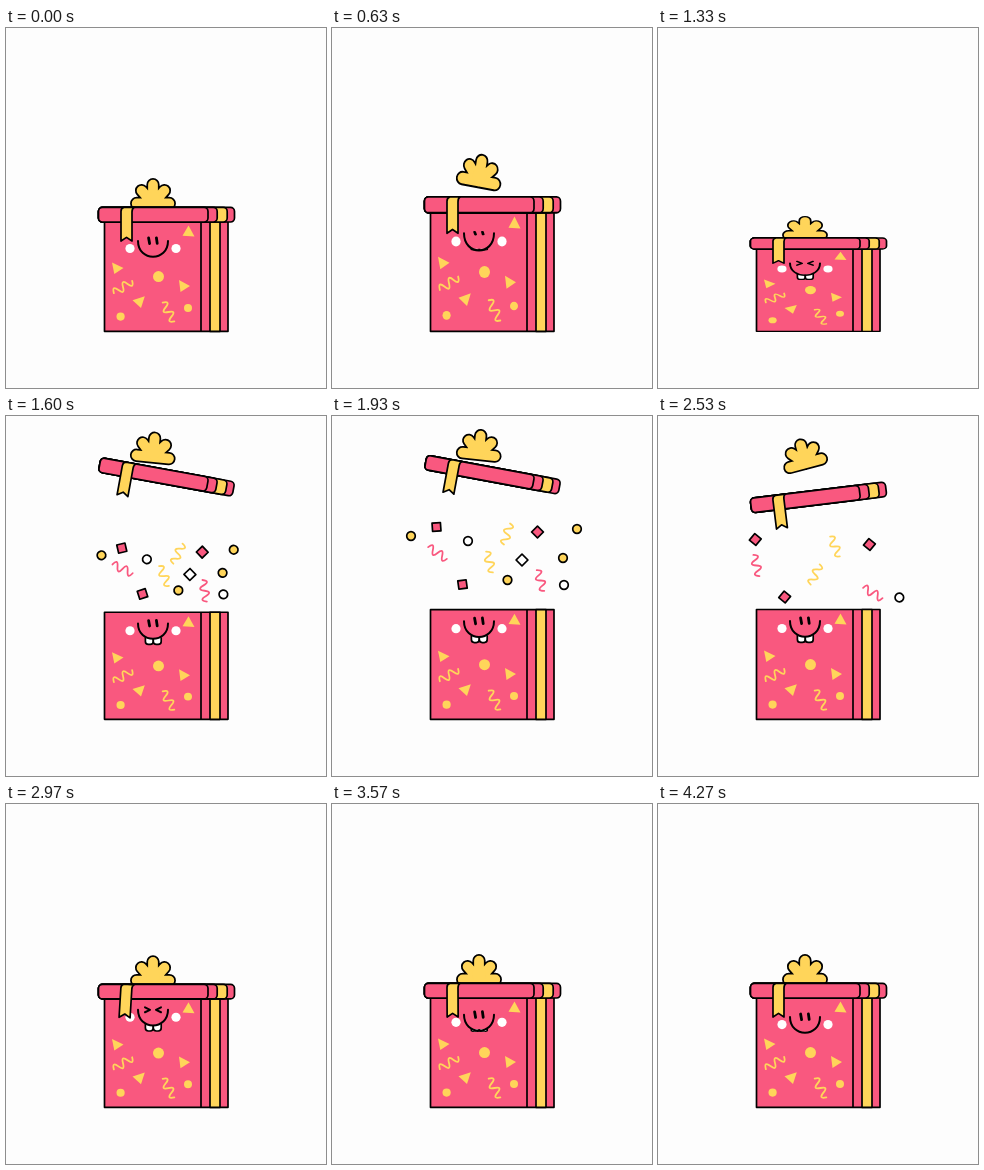
An HTML page that plays this animation: 320 px wide and 360 px high, repeating every 5.01 s.

```html
<!DOCTYPE html>
<html lang="en">
<head>
<meta charset="utf-8">
<title>Gift box</title>
<style>
  html, body { margin: 0; width: 100%; height: 100%; overflow: hidden; background: #fdfdfd; }
  svg { display: block; width: 100%; height: 100%; }
  .pink { fill: #f9587f; }
  .gold { fill: #ffd55a; }
  .white { fill: #fff; }
  .ink { stroke: #000; stroke-width: 1.7; stroke-linejoin: round; }
  .line { fill: none; stroke: #000; stroke-width: 2; stroke-linecap: round; stroke-linejoin: round; }
  .wave { fill: none; stroke-width: 1.8; stroke-linecap: round; }
  .wave.pink { stroke: #f9587f; }
  .wave.gold { stroke: #ffd55a; }
  #eyes { stroke-width: 2.8; }
</style>
</head>
<body>
<svg viewBox="0 0 320 360">
  <defs>
    <path id="wave" d="M-11 0q2.75-8 5.5 0t5.5 0 5.5 0 5.5 0"/>
    <path id="petals" d="M130.7 175.5H163.3M147 175.5V156.7M147 175.5L135.6 162.6M147 175.5L158.4 162.6"/>
  </defs>
  <g id="confetti"></g>
  <g id="body">
    <path class="pink ink" d="M98.5 193.5H222V303.3H98.5z"/>
    <path class="gold ink" d="M204 193.5h10V303.3h-10z"/>
    <path class="ink" d="M195 193.5V303.3"/>
    <g class="gold">
      <path d="M182.5 197.5L188.5 208.5L176.5 207.8z"/>
      <path d="M106 234.5L117.5 240L108.3 246z"/>
      <path d="M173 252L184 258L174.5 264z"/>
      <path d="M126.5 272.3L138.8 268.3L135 280z"/>
      <circle cx="152.5" cy="248.6" r="5.5"/>
      <circle cx="182" cy="280" r="4"/>
      <circle cx="114.6" cy="288.6" r="4.1"/>
    </g>
    <use href="#wave" class="wave gold" transform="translate(117 259) rotate(-34)"/>
    <use href="#wave" class="wave gold" transform="translate(162.5 284) rotate(58)"/>
    <g id="face">
      <circle class="white" cx="124" cy="220.5" r="4.6"/>
      <circle class="white" cx="170" cy="220.5" r="4.6"/>
      <g id="teeth">
        <rect class="white ink" x="139.4" y="224" width="7.9" height="10.4" rx="3"/>
        <rect class="white ink" x="147.3" y="224" width="7.9" height="10.4" rx="3"/>
        <path class="pink" d="M134 218h26l-4 9q-9 2.5-18 0z"/>
      </g>
      <path class="line" d="M132 213C132 234 162 234 162 213"/>
      <path id="eyes" class="line" d="M142.6 210l1 5.6M150.4 209.8l.8 5.6"/>
      <path id="squint" class="line" d="M139 210.5l5 2.6l-5 2.4M155 210.5l-5 2.6l5 2.4"/>
    </g>
  </g>
  <g id="top">
    <g id="bow" fill="none" stroke-linecap="round">
      <use href="#petals" stroke="#000" stroke-width="13.3"/>
      <use href="#petals" stroke="#ffd55a" stroke-width="9.8"/>
      <circle class="gold" cx="147" cy="171" r="7"/>
    </g>
    <g id="lid">
      <g id="bands"></g>
      <path id="tail" class="gold ink" d="M118 179.4H128Q126 180.5 126 184V213L120.5 209.4L115 213V183.5Q115 180 118 179.4z"/>
    </g>
  </g>
</svg>
<script>
const LOOP = 5010, FLOOR = 303.3;
const LAUNCH = 1400, DRIFT = 1930, DROP = 2530, LAND = 2590, CALM = 3180;
const $ = id => document.getElementById(id);
const set = (el, v) => el.setAttribute('transform', v);
const show = (el, on) => { el.style.display = on ? '' : 'none'; };

// motion helpers
const span = (t, a, b) => Math.max(0, Math.min(1, (t - a) / (b - a)));
const ramp = (t, a, b) => { const u = span(t, a, b); return u * u * (3 - 2 * u); };
const hold = (t, a, b, fade) => ramp(t, a, a + fade) - ramp(t, b - fade, b);
const bump = (t, a, b) => Math.sin(Math.PI * span(t, a, b));
const decay = (t, t0, life) => t < t0 ? 0 : Math.exp((t0 - t) / life);
const wobble = (t, t0, period, life) => decay(t, t0, life) * Math.sin(2 * Math.PI * (t - t0) / period);
const scaleAt = (y, s) => `translate(0 ${y * (1 - s)}) scale(1 ${s})`;

const rise = t => t < LAUNCH ? 0 : 1 - decay(t, LAUNCH, 50);

// quick launch, slow hover, sudden drop
function flight(t, height, hover, snap) {
  const fall = span(t, LAUNCH, LAND) ** snap;
  return -height * rise(t) * (1 - fall) - hover * bump(t, DRIFT, DROP);
}

function swing(t, from, to) {
  const angle = from * rise(t) + (to - from) * ramp(t, DRIFT, DROP);
  return angle * (1 - ramp(t, DROP, LAND));
}

function stretch(t) {
  const squash = ramp(t, 900, 1260) - ramp(t, 1390, 1450);
  return 1 + .086 * bump(t, 470, 830) - .247 * squash
    + .1 * wobble(t, 1435, 260, 150) - .2 * wobble(t, LAND, 320, 120);
}

function faceY(t) {
  if (t < CALM) return -8 * ramp(t, LAUNCH, LAUNCH + 100);
  return -8 * decay(t, CALM, 300) * Math.cos(2 * Math.PI * (t - CALM) / 400);
}

// shape, colour, x, y, angle; the first six vanish early
const bits = [
  ['dot', 'gold', 79, 120],
  ['dot', 'gold', 245, 113],
  ['dot', 'gold', 231, 142],
  ['dot', 'white', 136, 125],
  ['box', 'white', 190, 144, 45],
  ['dot', 'gold', 175.5, 164],
  ['dot', 'white', 232, 169],
  ['box', 'pink', 104.5, 111, -4],
  ['box', 'pink', 205.5, 116, 45],
  ['box', 'pink', 130.5, 168.5, -8],
  ['wave', 'pink', 105.5, 137, 32],
  ['wave', 'gold', 175, 118, 106],
  ['wave', 'gold', 157.5, 146, 72],
  ['wave', 'pink', 208.5, 164.5, 70]
];
const shapes = {
  dot: c => `<circle class="${c} ink" r="4.3"/>`,
  box: c => `<path class="${c} ink" d="M-4.2-4.2h8.4v8.4h-8.4z"/>`,
  wave: c => `<use href="#wave" class="wave ${c}"/>`
};
$('confetti').innerHTML = bits.map(([shape, c]) => `<g>${shapes[shape](c)}</g>`).join('');
const nodes = [...$('confetti').children];

$('bands').innerHTML = [136, 128.7, 118.7, 109.5].map((w, i) =>
  `<rect class="${i === 1 ? 'gold' : 'pink'} ink" x="92.5" y="179.4" width="${w}" height="14.6" rx="4"/>`).join('');

function drawBits(t) {
  const burst = 1 - (1 - span(t, LAUNCH + 40, DRIFT)) ** 4;
  const drift = ramp(t, DRIFT, DROP);
  bits.forEach(([shape, , x, y, angle = 0], i) => {
    const end = i < 6 ? 2440 + 12 * i : 2560;
    const spin = shape === 'box' ? 40 - angle : i % 2 ? -42 : 42;
    const px = 160 + (x - 160) * (burst + .13 * drift);
    const py = 215 + (y - 215) * burst + 12.5 * drift;
    show(nodes[i], t > LAUNCH + 40 && t < end);
    set(nodes[i], `translate(${px} ${py}) rotate(${angle + spin * (burst - 1 + drift)})`);
  });
}

function draw(t) {
  const s = stretch(t);
  const open = 1 - hold(t, 595, 1450, 70) - hold(t, LAND, 3370, 70);
  const teeth = hold(t, 590, 3630, 140);
  const hop = bump(t, 480, 820);
  const flying = t > 1435 && t < LAND;

  set($('body'), scaleAt(FLOOR, s));
  set($('top'), scaleAt(FLOOR, flying ? 1 : s));
  set($('lid'), `translate(0 ${flight(t, 128, 8, 34)}) rotate(${swing(t, 10.5, -7)} 160.5 187)`);
  set($('tail'), `rotate(${-18 * wobble(t, LAND, 460, 250)} 121 181)`);
  set($('bow'), `translate(0 ${flight(t, 137, 12, 54) - 10.8 * hop}) rotate(${swing(t, 6, -15) + 10 * hop} 147 173)`);
  set($('face'), `translate(0 ${faceY(t)})`);
  set($('eyes'), scaleAt(213, open));
  show($('eyes'), open > .01);
  show($('squint'), open <= .01);
  set($('teeth'), scaleAt(227, teeth));
  show($('teeth'), teeth > .01);
  drawBits(t);
}

const start = performance.now();
function tick() {
  draw((performance.now() - start) % LOOP);
  requestAnimationFrame(tick);
}
tick();
</script>
</body>
</html>
```
